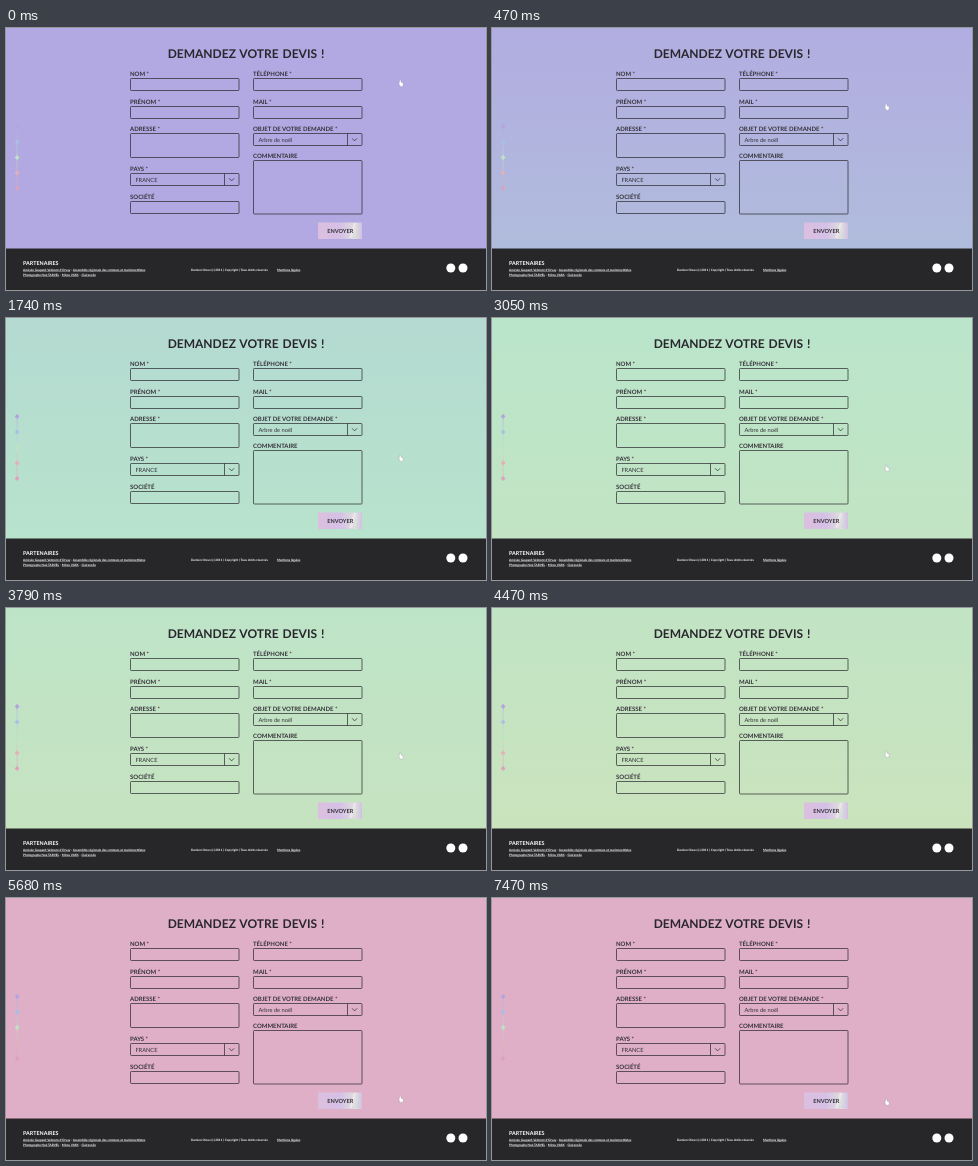
Animation, 480 px wide and 262 px high, one loop 7.52 s. Source, as an HTML page:

```html
<!DOCTYPE html>
<html lang="fr">
<head>
<meta charset="utf-8">
<style>
html, body { margin: 0; width: 100%; height: 100%; overflow: hidden; }
svg { display: block; width: 480px; height: 262px; }
text { font: 700 6px Lato, "Open Sans", sans-serif; fill: #353139; text-rendering: geometricPrecision; }
.title { font-size: 12px; word-spacing: 1px; fill: #29262d; }
.value { font-weight: 400; font-size: 5.7px; }
.send { font-size: 5.6px; }
.head { font-size: 5.4px; fill: #fff; }
.small { font-size: 3.1px; fill: #fff; }
.link { text-decoration: underline; }
.star { fill: #653749; }
#fields { fill: none; stroke: #29262d; stroke-opacity: .7; }
</style>
</head>
<body>
<svg viewBox="0 0 480 262">
  <defs>
    <linearGradient id="sky" x2="0" y2="1"><stop id="top"/><stop id="bottom" offset="1"/></linearGradient>
    <linearGradient id="foil">
      <stop stop-color="#dcbfdf"/><stop offset=".5" stop-color="#d5c0e6"/>
      <stop offset=".85" stop-color="#dfdfdc"/><stop offset="1" stop-color="#d5bce5"/>
    </linearGradient>
    <linearGradient id="rail"></linearGradient>
  </defs>
  <rect width="480" height="221" fill="url(#sky)"/>
  <g id="dots"></g>
  <text class="title" x="240" y="30" text-anchor="middle">DEMANDEZ VOTRE DEVIS !</text>
  <g id="labels"></g>
  <g id="fields"></g>
  <rect x="312" y="194.5" width="44" height="16.5" fill="url(#foil)"/>
  <path d="M343 210l5-15h2l-4 15z" fill="#f0e8f2" opacity=".75"/>
  <path d="M349 210l6-14v4l-4 10z" fill="#c3d9dd" opacity=".7"/>
  <text class="send" x="334.3" y="204.9" text-anchor="middle">ENVOYER</text>
  <rect y="220.5" width="480" height="42" fill="#272629"/>
  <text class="head" x="17" y="237">PARTENAIRES</text>
  <text class="small" x="17" y="242.7"><tspan class="link">Amicale Gaspard-Velmont d'Orvay</tspan> - <tspan class="link">Assemblée régionale des conteurs et marionnettistes</tspan></text>
  <text class="small" x="17" y="247.5"><tspan class="link">Photographe Noé TARVEL</tspan> - <tspan class="link">Mirou VASK</tspan> - <tspan class="link">Clairevoile</tspan></text>
  <text class="small" x="185" y="242.5">Damien Orsuv (c) 2011 | Copyright | Tous droits réservés</text>
  <text class="small link" x="271" y="242.5">Mentions légales</text>
  <circle cx="444.8" cy="240" r="4.5" fill="#fff"/>
  <circle cx="457" cy="240" r="4.5" fill="#fff"/>
  <path id="cursor" d="M-1.5-3.2l1 0 .4 2.4 2 .6v2.2l-.8 1.4h-2l-1.5-2.4z" fill="#fff" stroke="#8d8b98" stroke-width=".35"/>
</svg>
<script>
const $ = id => document.getElementById(id);
const add = (id, markup) => $(id).insertAdjacentHTML('beforeend', markup);

// Stacks labelled fields; a field with a value is a drop-down.
function column(x, gap, fields) {
  let next = 50.6;
  for (const { label, height = 12, value } of fields) {
    const y = Math.floor(next) + .5;
    const text = label.replace('*', '<tspan class="star">*</tspan>');
    add('labels', `<text x="${x}" y="${y - 3}">${text}</text>`);
    add('fields', `<rect x="${x + .5}" y="${y}" width="108.5" height="${height}" rx=".8"/>`);
    if (value) {
      add('labels', `<text class="value" x="${x + 5.4}" y="${y + 8.3}">${value}</text>`);
      add('fields', `<path d="M${x + 94.5} ${y}v12m4.6-7.2l2.5 2.6 2.5-2.6"/>`);
    }
    next += height + gap;
  }
}
column(124, 15.6, [
  { label: 'NOM *' }, { label: 'PRÉNOM *' }, { label: 'ADRESSE *', height: 24 },
  { label: 'PAYS *', value: 'FRANCE' }, { label: 'SOCIÉTÉ' }
]);
column(247, 15.45, [
  { label: 'TÉLÉPHONE *' }, { label: 'MAIL *' },
  { label: 'OBJET DE VOTRE DEMANDE *', value: 'Arbre de noël' },
  { label: 'COMMENTAIRE', height: 53.5 }
]);

$('rail').setAttribute('gradientTransform', 'rotate(90)');
add('dots', '<rect x="10.6" y="96" width="1" height="66" fill="url(#rail)" opacity=".55"/>');
['#b3a4e0', '#abbfe4', '#bee4c2', '#e4b0b8', '#dda2be'].forEach((color, i) => {
  add('dots', `<path d="M11.1 ${95.9 + i * 15.5}l2.4 2.6-2.4 2.6-2.4-2.6z" fill="${color}"/>`);
  add('rail', `<stop offset="${i / 4}" stop-color="${color}"/>`);
});

// lavender, blue, green, lime, pink
const palette = [[178, 169, 226], [174, 206, 214], [185, 229, 204], [206, 226, 185], [222, 175, 199]];
const mix = (a, b, k) => a + (b - a) * k;

function shade(p) {
  p = Math.max(0, Math.min(4, p));
  const i = Math.min(3, Math.floor(p));
  return `rgb(${palette[i].map((v, c) => Math.round(mix(v, palette[i + 1][c], p - i)))})`;
}

// time, pointer height, place in the palette
const keys = [
  [0, 55, -.4], [950, 103, .65], [1740, 140, 1.5], [3050, 150, 2.05],
  [4470, 146, 2.4], [5680, 201, 4], [7520, 204, 4]
];

function draw(now) {
  const t = now % 7520;
  const n = keys.findIndex(key => key[0] > t);
  const [t0, y0, p0] = keys[n - 1], [t1, y1, p1] = keys[n];
  const k = (t - t0) / (t1 - t0);
  const p = mix(p0, p1, k);
  $('top').setAttribute('stop-color', shade(p));
  $('bottom').setAttribute('stop-color', shade(p + .4));
  $('cursor').setAttribute('transform', `translate(395.3 ${mix(y0, y1, k)})`);
  requestAnimationFrame(draw);
}
draw(0);
</script>
</body>
</html>
```
